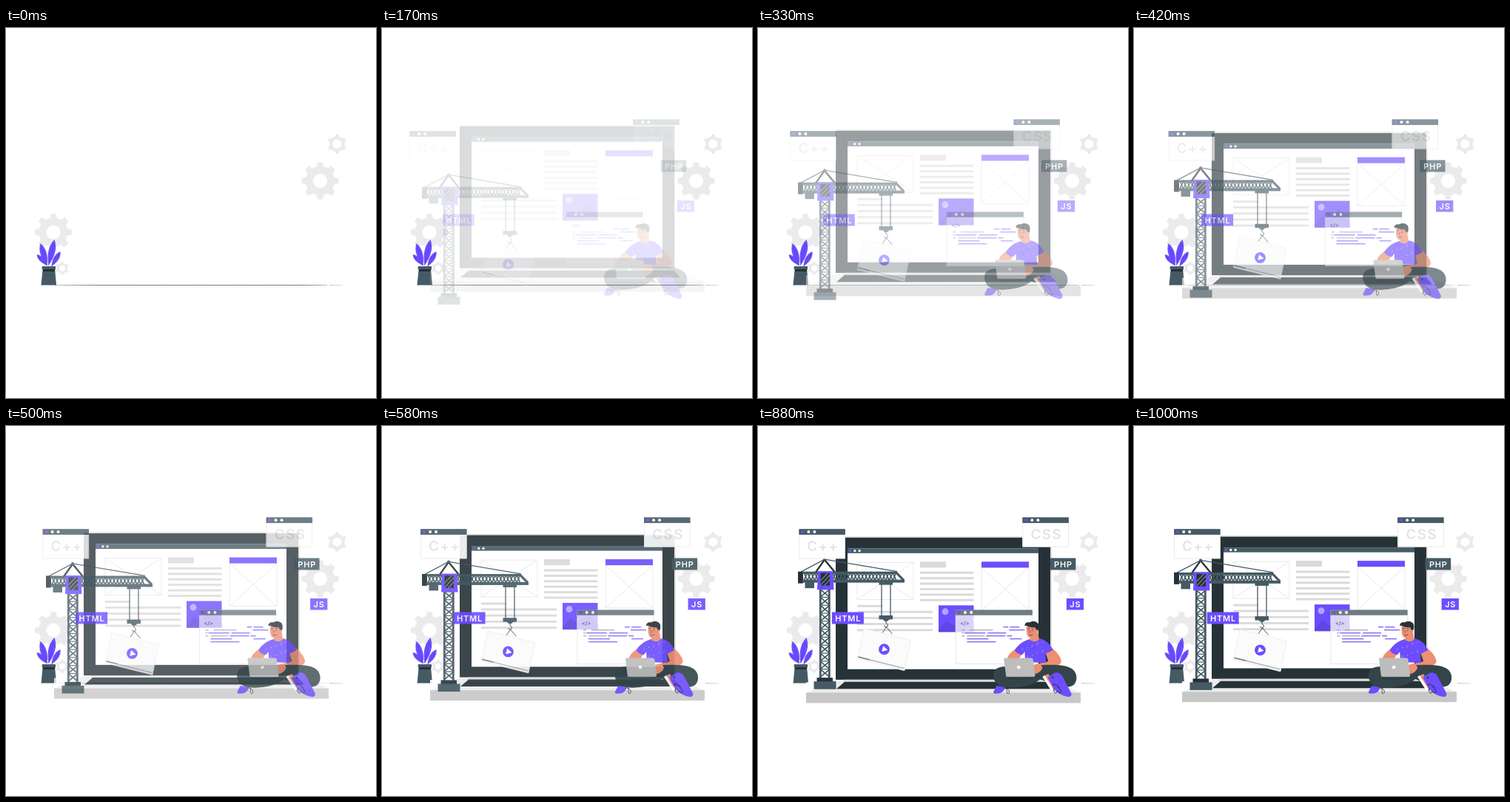
Recreate the animation shown at these times as an HTML page with a canvas. Size 500 by 500 pixels, loop 1040 ms.

```html
<!DOCTYPE html>
<html lang="en">
<head>
<meta charset="utf-8">
<title>Website under construction</title>
<style>
html, body { margin: 0; width: 100%; height: 100%; overflow: hidden; background: #fff; }
canvas { display: block; width: 500px; height: 500px; }
</style>
</head>
<body>
<canvas id="stage"></canvas>
<script>
const LOOP = 1040;
const PURPLE = '#6c4dff', SLATE = '#455a64', DARK = '#263238', SKIN = '#ed8f72';
const ratio = window.devicePixelRatio || 1;
const stage = document.getElementById('stage');
const scratch = document.createElement('canvas');
for (const c of [stage, scratch]) c.width = c.height = Math.round(500 * ratio);
const out = stage.getContext('2d'), layer = scratch.getContext('2d');
let g = out;

// ---- drawing helpers ----
function rect(x1, y1, x2, y2, fill) {
  g.fillStyle = fill;
  g.fillRect(x1, y1, x2 - x1, y2 - y1);
}
function frame(x1, y1, x2, y2, color) {
  g.strokeStyle = color;
  g.lineWidth = 0.8;
  g.strokeRect(x1, y1, x2 - x1, y2 - y1);
}
function poly(fill, ...p) {
  g.beginPath();
  for (let i = 0; i < p.length; i += 2) g.lineTo(p[i], p[i + 1]);
  g.closePath();
  g.fillStyle = fill;
  g.fill();
}
function line(color, width, ...p) {
  g.beginPath();
  for (let i = 0; i < p.length; i += 2) g.lineTo(p[i], p[i + 1]);
  g.strokeStyle = color;
  g.lineWidth = width;
  g.stroke();
}
function dot(x, y, r, fill) {
  g.beginPath();
  g.arc(x, y, r, 0, 7);
  g.fillStyle = fill;
  g.fill();
}
function shape(fill, d) {
  g.fillStyle = fill;
  g.fill(new Path2D(d));
}
function curve(color, width, d) {
  g.strokeStyle = color;
  g.lineWidth = width;
  g.stroke(new Path2D(d));
}
function label(str, x, y, size, fill, weight, gap) {
  g.font = `${weight} ${size}px Inter, sans-serif`;
  g.letterSpacing = gap + 'px';
  g.textAlign = 'center';
  g.fillStyle = fill;
  g.fillText(str, x + gap / 2, y);
}
function tag(str, x1, y1, x2, y2, fill) {
  rect(x1, y1, x2, y2, fill);
  label(str, (x1 + x2) / 2, (y1 + y2) / 2 + 4, 11, '#fff', 600, 0.8);
}
function dots(x, y, step, r) {
  dot(x, y, r, PURPLE);
  dot(x + step, y, r, '#fff');
  dot(x + 2 * step, y, r, '#fff');
}
function placeholder(x1, y1, x2, y2) {
  frame(x1, y1, x2, y2, '#e3e3e3');
  line('#e3e3e3', 0.8, x1, y1, x2, y2);
  line('#e3e3e3', 0.8, x1, y2, x2, y1);
}

// ---- still scenery ----
function gear(x, y, r, hole, teeth) {
  g.save();
  g.translate(x, y);
  g.beginPath();
  g.arc(0, 0, r * 0.79, 0, 7);
  g.arc(0, 0, hole, 7, 0, true);
  g.fillStyle = '#ebebeb';
  g.fill('evenodd');
  for (let i = 0; i < teeth; i++) {
    poly('#ebebeb', -r * 0.2, -r * 0.7, -r * 0.14, -r, r * 0.14, -r, r * 0.2, -r * 0.7);
    g.rotate(2 * Math.PI / teeth);
  }
  g.restore();
}
function leaf(x, y, tx, ty, w) {
  g.save();
  g.translate(x, y);
  g.rotate(Math.atan2(ty - y, tx - x));
  const n = Math.hypot(tx - x, ty - y);
  shape(PURPLE, `M0 0C${n * 0.4} ${-w} ${n * 0.75} ${-w} ${n} 0C${n * 0.75} ${w} ${n * 0.4} ${w} 0 0`);
  line('#5238d6', 0.5, 0, 0, n * 0.85, 0);
  g.restore();
}
function scenery() {
  gear(424.5, 206.5, 25, 9.5, 8);
  gear(447.5, 156.8, 13.3, 6, 6);
  gear(64, 276, 25, 9.5, 8);
  gear(76, 324.7, 9.2, 4, 6);
  const fade = g.createLinearGradient(66, 0, 458, 0);
  fade.addColorStop(0, 'rgba(38,50,56,.3)');
  fade.addColorStop(0.15, 'rgba(38,50,56,.65)');
  fade.addColorStop(0.85, 'rgba(38,50,56,.65)');
  fade.addColorStop(1, 'rgba(38,50,56,.1)');
  rect(66, 347, 434, 348, fade);
  rect(437, 347, 455, 348, fade);
  leaf(56, 321, 41.5, 306, 4);
  leaf(55.5, 321, 46.5, 291, 5.6);
  leaf(57.5, 321, 65.5, 286, 6);
  leaf(61.5, 322, 73.5, 302, 4.6);
  poly(SLATE, 49.5, 327, 66.2, 327, 68, 347.5, 47.5, 347.5);
  rect(48.7, 322, 67, 326.5, SLATE);
  rect(50, 326, 66, 329, DARK);
}

// ---- big laptop and its page ----
function laptop() {
  rect(65, 345, 436, 360, '#fff');
  poly('#ececec', 65, 359.5, 104, 343, 397, 343, 436, 359.5);
  rect(65, 359, 436, 373, '#c7c7c7');
  rect(107, 147.8, 397, 341.5, '#dcdcdc');
  rect(105, 149.5, 395, 341.5, DARK);
  rect(121, 164, 379, 327.3, '#fff');
  rect(121, 164, 379, 170.5, SLATE);
  dots(124.5, 167.3, 6.3, 1.7);
  poly('#dcdcdc', 116, 341.5, 395, 341.5, 395, 344.5, 114, 344.5);
  poly(DARK, 117, 344.5, 395, 344.5, 403, 354, 106, 354);

  placeholder(134, 183, 210, 233);
  rect(219, 182, 254, 190, '#dadada');
  for (let i = 0; i < 6; i++) rect(219, 195.4 + i * 7.4, 291.5, 198.4 + i * 7.4, '#dadada');
  rect(134, 240.5, 168, 243.4, '#dadada');
  for (let i = 0; i < 4; i++) rect(134, 248.4 + i * 8.2, 236, 251.3 + i * 8.2, '#dadada');
  placeholder(302, 190, 366, 248);
  rect(302, 182, 366, 190, PURPLE);

  rect(244, 241, 291.5, 277, PURPLE);
  dot(253, 249.5, 4.5, '#b2a2ff');
  poly('#5f45e2', 244, 274, 255, 262, 264, 269, 276, 252, 291.5, 271, 291.5, 277, 244, 277);
}

// ---- crane with the hanging window ----
function hanging() {
  line(DARK, 0.8, 167, 282.5, 173.5, 273, 181.5, 282.5);
  g.save();
  g.translate(143, 275);
  g.transform(1, 0.25, -0.21, 1, 0, 0);
  rect(0, 0, 63.5, 41, '#fbfbfb');
  frame(0, 0, 63.5, 41, '#ececec');
  line('#b5b5b5', 1.4, 0.5, 38.3, 62.5, 38.3);
  line('#7a858a', 1.6, 0.5, 38.3, 16, 38.3);
  g.restore();
  dot(170.5, 303, 7.4, PURPLE);
  poly('#fff', 169.2, 298.6, 175.4, 304.2, 167.2, 306.2);
}
function crane() {
  hanging();
  // mast
  for (const x of [84.3, 96.3]) line(SLATE, 2.8, x, 220, x, 343);
  for (let y = 222; y < 340; y += 10.8) {
    line(SLATE, 1.7, 84, y, 97, y + 10.8);
    line(SLATE, 1.7, 97, y, 84, y + 10.8);
    line(SLATE, 1.2, 84, y, 97, y);
  }
  rect(79.5, 341.5, 101, 347.5, DARK);
  rect(75.5, 346.5, 105.5, 357, SLATE);
  // stays
  line(SLATE, 1.3, 58, 198.5, 90, 181.5, 188, 198);
  line(DARK, 2.4, 78, 199, 90, 182, 104, 199);
  dot(90, 181.5, 2, SLATE);
  // jib
  rect(54, 198, 61, 214, DARK);
  line(SLATE, 3.2, 60, 199.7, 187, 199.7, 197, 210);
  rect(60, 209, 198, 213, SLATE);
  for (let x = 62; x < 186; x += 9.6) {
    line(SLATE, 1.7, x, 210, x + 4.8, 199.5, x + 9.6, 210);
    line(SLATE, 1.5, x, 199.5, x + 4.8, 210, x + 9.6, 199.5);
  }
  rect(63.5, 212, 76, 220.5, SLATE);
  poly(PURPLE, 81, 197.5, 101, 197.5, 102.5, 222.5, 80, 222.5);
  rect(84.5, 200, 97, 217, DARK);
  g.save();
  g.beginPath();
  g.rect(84.5, 200, 12.5, 17);
  g.clip();
  for (let i = 0; i < 3; i++) line('#788890', 1.2, 83, 212 + i * 6, 98, 196 + i * 6);
  g.restore();
  // trolley, cables, hook
  rect(163.5, 212, 182, 216, SLATE);
  line(SLATE, 1.3, 167, 215, 167, 258);
  line(SLATE, 1.3, 179, 215, 179, 258);
  rect(163.5, 257.3, 182, 262.7, SLATE);
  poly(SLATE, 168, 262, 178, 262, 175, 265, 171, 265);
  curve(DARK, 0.9, 'M173 264V267.500C176 269 176 273 173 273C171.500 273 170.500 272 170.500 271');
}

// ---- floating windows and tags ----
function cardWindow(str, x, y) {
  rect(x, y, x + 62.5, y + 40, '#fff');
  frame(x + 0.4, y + 0.4, x + 62.1, y + 39.8, '#e6e6e6');
  rect(x, y, x + 62.5, y + 7.7, SLATE);
  dots(x + 5, y + 3.9, 8, 2);
  label(str, x + 31.8, y + 29.5, 18.8, '#e4e4e4', 600, 1.4);
}
function leftCards() {
  cardWindow('C++', 54, 139.2);
  tag('HTML', 98.5, 251.5, 141.5, 267.5, PURPLE);
}
function codeLines() {
  const rows = [
    [330, 337, 339, 352],
    [274, 278, 285, 316, 338, 359],
    [274, 277, 278, 306, 309, 334],
    [274, 278, 281, 305, 307, 333, 335, 342],
    [281, 310, 339, 355],
    [281, 320]
  ];
  rows.forEach((row, i) => {
    for (let j = 0; j < row.length; j += 2) {
      const y = 271 + i * 4, gray = row[j] === 274 || i === 1 && j === 2 || i === 3 && j === 2;
      rect(row[j], y, row[j + 1], y + 1.3, gray ? '#a9a5bd' : '#7a62ee');
    }
  });
}
function rightCards() {
  rect(265.5, 255, 369.5, 321.5, 'rgba(255,255,255,.76)');
  frame(265.9, 249, 369.1, 321.5, '#e2e2e2');
  rect(265.5, 248.5, 369.5, 255.7, '#6d7b82');
  dots(270.3, 252.1, 8.3, 2);
  label('</>', 278, 268.5, 7, '#6a5f9c', 600, 0);
  codeLines();
  cardWindow('CSS', 356, 123.4);
  tag('PHP', 393.5, 178.5, 428, 194.5, SLATE);
  tag('JS', 415.5, 233, 438.8, 248.5, PURPLE);
}

// ---- man with a small laptop ----
function man() {
  // far shoe
  shape(PURPLE, 'M321 351L333 353C331 358 328 362 322 361.5C318 362 316 361 317 359Z');
  curve(DARK, 0.8, 'M332 354C337 354 340 359 337 361.5C334 362 335 357 335 354');
  // arms and shirt
  shape(SKIN, 'M347 301C340 306 336 310 336 314L350 316L358 305Z');
  shape(SKIN, 'M386 303L396 300C403 306 408 312 408.500 318C408 325 390 329 378 334L371 335C368 331 370 325 374 322L391 318Z');
  shape(PURPLE, 'M363 289C356 291 349 297 345.500 303C348 307 352 309 356 309L359 305L360 319L388 320L387 308L397 303C394 295 388 289 380 287.500C375 286 368 287 363 289Z');
  for (let i = 0; i < 16; i++) {
    const x = 355 + (i * 13.7) % 34, y = 291 + (i * 7.3) % 25;
    if (y < 304 || x > 361 && x < 386) dot(x, y, 0.6, '#c6baff');
  }
  // legs
  shape('#33454a', 'M317 340C315 330 322 325 333 325L372 324C392 322 412 322 421 327C431 332 431 345 425 350C418 355 405 352 392 347L380 342C374 348 360 353 345 353.500C330 355 319 351 317 340Z');
  curve(DARK, 0.8, 'M336 341C350 343 367 342 380 337');
  poly(SKIN, 384, 338, 391, 335, 401, 351, 397, 358);
  poly('#fff', 383, 339, 386, 337, 398, 356, 395, 358);
  // near shoe
  shape(PURPLE, 'M390 339.500L400 333.500C404 332.500 408 334.500 410 338L422 361C423 364 421 366 418 366C411 365 403 361 399 356Z');
  dot(397, 340, 1.2, DARK);
  curve(DARK, 1, 'M398 351C394 347 404 349 406 354M399 354C397 360 402 364 403 358M403 352C411 358 408 363 404 359');
  // hand and laptop
  shape(SKIN, 'M368 325C374 320 381 321 383 326C382 332 375 336 369 335Z');
  shape('#bdbdbd', 'M332 313.500H368Q370 313.500 370.300 315.500L373 337Q373 339 371 339H336Q334 339 333.700 337L331 315.500Q331 313.500 332 313.500Z');
  line('#a5a5a5', 0.8, 334, 338.6, 372, 338.6);
  dot(351, 326, 2.3, '#fff');
  // head
  shape(SKIN, 'M367 281L377 279L378.500 288C376 292 370 292 366 289Z');
  shape(SKIN, 'M361.500 271C361 279 362 286 366.500 286C372 286.500 375.500 281 376 275L375 268H363Z');
  shape(DARK, 'M359.500 270.500C358 266.500 362 264.500 366 265.300C370 262.800 377 264 378 269C378.800 273 377.500 277 375.500 279.500L373.500 272.500C370 272 364 272 361.500 269.500Z');
  dot(375.500, 277, 1.8, SKIN);
  dot(364.5, 276, 0.6, DARK);
  dot(369.7, 276.3, 0.6, DARK);
  curve(DARK, 0.7, 'M363 273.800L365.500 273.300M368.200 273.500L371.200 274.100M366.800 276.500L366 279.500M365 282.300Q367.500 283.800 370 281.800');
}

// ---- motion: slide in, pass the goal a little, settle ----
const ease = x => (1 - Math.cos(Math.PI * x)) / 2;
const TURN = 20, LAST = 25, START = 20, OVER = -1.5;

function offset(step) {
  if (step < TURN) return START + (OVER - START) * ease((step / TURN) ** 0.85);
  return OVER * (1 - ease((step - TURN) / (LAST - TURN)));
}
function group(draw, dx, dy, alpha) {
  g = layer;
  g.setTransform(1, 0, 0, 1, 0, 0);
  g.clearRect(0, 0, scratch.width, scratch.height);
  g.setTransform(ratio, 0, 0, ratio, dx * ratio, dy * ratio);
  draw();
  g = out;
  g.globalAlpha = alpha;
  g.drawImage(scratch, 0, 0, 500, 500);
  g.globalAlpha = 1;
}
function render(ms) {
  // 24 steps a second, snapped to hundredths
  const step = Math.floor((Math.floor(ms / 10) + 0.52) / 4.17);
  g = out;
  g.setTransform(ratio, 0, 0, ratio, 0, 0);
  rect(0, 0, 500, 500, '#fff');
  scenery();
  if (step < 2) return;
  const d = offset(step), alpha = Math.min(1, 1 - d / START);
  group(laptop, 0, -d, alpha);
  group(crane, 0, d, alpha);
  group(leftCards, -d, 0, alpha);
  group(rightCards, -d, 0, alpha);
  group(man, -d, 0, alpha);
}

const begin = performance.now();
function tick() {
  render((performance.now() - begin) % LOOP);
  requestAnimationFrame(tick);
}
tick();
</script>
</body>
</html>
```
